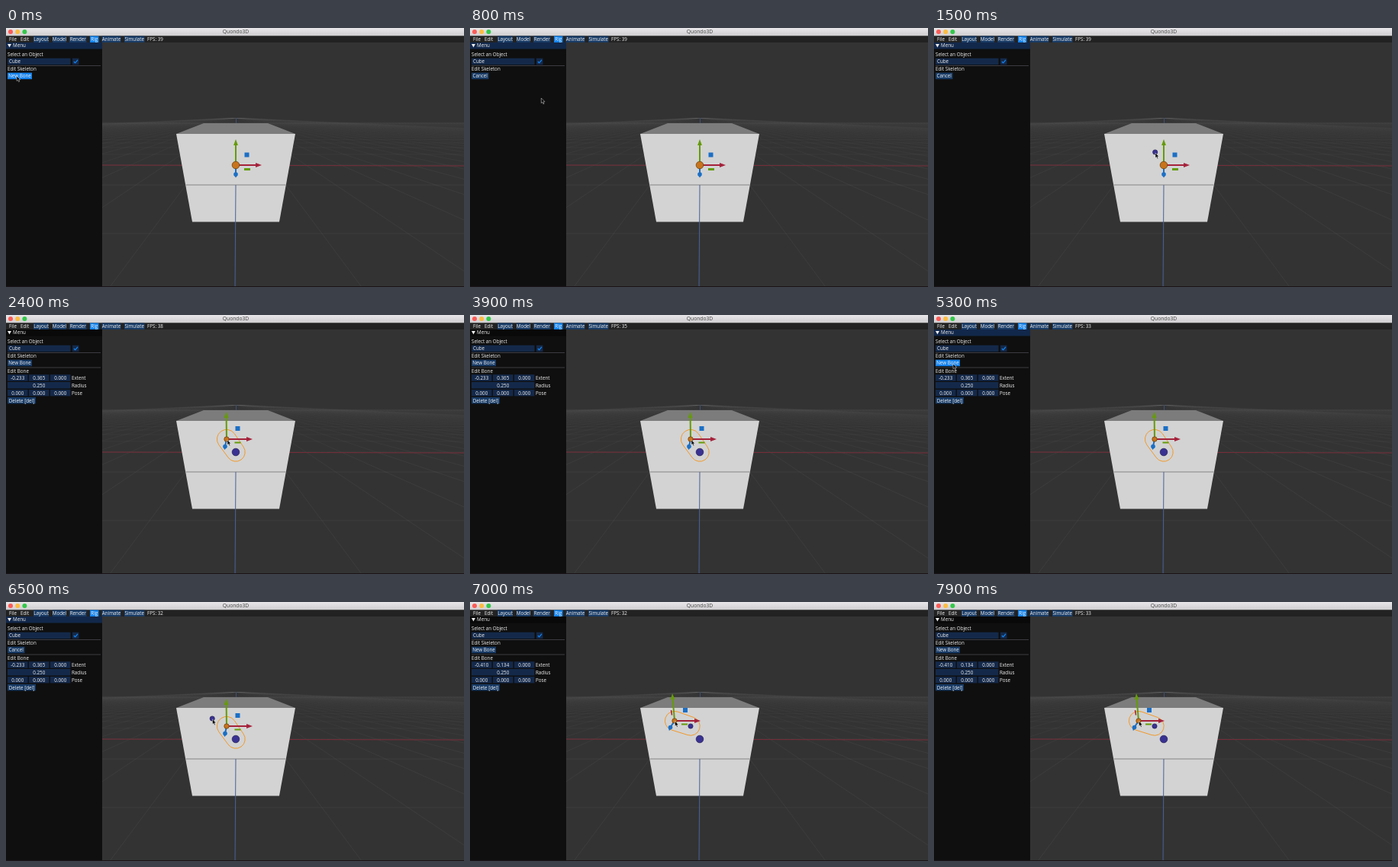
Recreate the animation shown at these times as an HTML page with a canvas. Size 600 by 340 pixels, loop 8000 ms.

```html
<!DOCTYPE html>
<html lang="en">
<head>
<meta charset="utf-8">
<title>Rig editor</title>
<style>
html, body { margin: 0; width: 100%; height: 100%; overflow: hidden; background: #333; }
canvas { display: block; }
</style>
</head>
<body>
<canvas id="stage" width="600" height="340"></canvas>
<script>
const LOOP = 8000, PANEL = 126;
const ctx = document.getElementById('stage').getContext('2d');
const BUTTON = '#183b66', HOVER = '#1483ee', FRAME = '#14294a', JOINT = '#3a3292';
const RED = '#a5223b', GREEN = '#659b08', BLUE = '#1b6fc6', ORANGE = '#f29929';

const BASE = [301, 180], TIP = [289, 163], TIP2 = [268, 156];
const FPS = [[0, 39], [2000, 38], [2900, 37], [3400, 36], [3800, 35], [4600, 34], [5000, 33], [5900, 32], [7700, 33]];
// Cursor moves: start, end, destination
const START = [14, 63];
const MOVES = [[500, 1350, 290, 164], [4300, 5150, 25, 64], [5500, 6400, 270.5, 154], [6500, 6700, 268.5, 156.5]];
const GIZMOS = {
  cube: { at: BASE, up: [0, -34], blue: [0, 12], square: [14.5, -13.5], flat: [15, 5.5, 3], ball: 4.8 },
  first: { at: TIP, up: [-.5, -36], blue: [-2, 9.5], square: [14.5, -14], flat: [14.5, 4.5, 2], ball: 3.2 },
  second: { at: TIP2, up: [-3, -36], blue: [-5.5, 8.5], square: [14, -14], flat: [13, 4.5, 2], ball: 3.2, stub: true }
};

function rect(x, y, w, h, fill) {
  ctx.fillStyle = fill;
  ctx.fillRect(x, y, w, h);
}
function poly(points, fill) {
  ctx.beginPath();
  points.forEach(p => ctx.lineTo(...p));
  ctx.closePath();
  ctx.fillStyle = fill;
  ctx.fill();
}
function line(x1, y1, x2, y2, color, width = 1) {
  ctx.beginPath();
  ctx.moveTo(x1, y1);
  ctx.lineTo(x2, y2);
  ctx.strokeStyle = color;
  ctx.lineWidth = width;
  ctx.stroke();
}
function dot([x, y], r, fill, outline) {
  ctx.beginPath();
  ctx.arc(x, y, r, 0, 7);
  ctx.fillStyle = fill;
  ctx.fill();
  if (outline) {
    ctx.strokeStyle = outline;
    ctx.lineWidth = .8;
    ctx.stroke();
  }
}
function text(s, x, y, align = 'left', color = '#f2f2f2', size = 6.25) {
  ctx.font = size + 'px "Open Sans", sans-serif';
  ctx.textAlign = align;
  ctx.fillStyle = color;
  ctx.fillText(s, x, y + 2.3);
}
function box(s, x, w, y, fill) {
  rect(x, y - 4.3, w, 8.5, fill);
  text(s, x + w / 2, y, 'center');
}

function cursorAt(t) {
  let [x, y] = START;
  for (const [from, to, tx, ty] of MOVES) {
    const u = Math.min(1, Math.max(0, (t - from) / (to - from)));
    const e = u * u * (3 - 2 * u);
    x += (tx - x) * e;
    y += (ty - y) * e;
  }
  return [x, y];
}

function drawScene() {
  rect(0, 0, 600, 340, '#333');
  ctx.save();
  ctx.beginPath();
  ctx.rect(PANEL, 118, 474, 222);
  ctx.clip();
  const grid = ctx.createLinearGradient(0, 118, 0, 200);
  grid.addColorStop(0, 'rgba(255,255,255,.012)');
  grid.addColorStop(1, 'rgba(255,255,255,.045)');
  for (let k = -30; k <= 30; k++) line(301, 118, 301 + k * 165, 340, grid);
  for (let z = -30; z < 3; z++) {
    const y = 118 + 209.6 / (3.38 - z);
    line(PANEL, y, 600, y, grid);
  }
  ctx.restore();
  line(PANEL, 180, 600, 181, '#782d3a');
  line(301.5, 118, 301.5, 126, '#3d5078');
  poly([[259, 125], [343, 125], [379, 139], [223, 139]], '#7c7c7c');
  poly([[223, 139], [379, 139], [358, 254.5], [244, 254.5]], '#d3d3d3');
  line(235.5, 206, 366.5, 206, '#858585');
  line(301, 206, 300, 340, '#466095');
}

function capsule([ax, ay], [bx, by]) {
  const a = Math.atan2(by - ay, bx - ax);
  ctx.beginPath();
  ctx.arc(ax, ay, 12.2, a + Math.PI / 2, a - Math.PI / 2);
  ctx.arc(bx, by, 12.6, a - Math.PI / 2, a + Math.PI / 2);
  ctx.closePath();
  ctx.strokeStyle = ORANGE;
  ctx.lineWidth = 1;
  ctx.stroke();
}

function arrow(dx, dy, color) {
  const n = Math.hypot(dx, dy), ux = dx / n, uy = dy / n, bx = dx - ux * 8, by = dy - uy * 8;
  line(0, 0, bx, by, color, 2);
  poly([[dx, dy], [bx - uy * 2.9, by + ux * 2.9], [bx + uy * 2.9, by - ux * 2.9]], color);
}

function drawGizmo({ at, up, blue, square, flat, ball, stub }) {
  ctx.save();
  ctx.translate(...at);
  line(0, 0, ...blue, BLUE, 2);
  dot(blue, 2.8, BLUE);
  poly([[blue[0] - 2.5, blue[1] + 1], [blue[0] + 2.5, blue[1] + 1], [blue[0] * 1.3, blue[1] + 4.5]], BLUE);
  arrow(...up, GREEN);
  arrow(34, 0, RED);
  rect(square[0] - 3, square[1] - 3, 6, 6, BLUE);
  rect(flat[0] - 4, flat[1] - flat[2] / 2, 8, flat[2], GREEN);
  if (stub) line(-4.5, -14, -3.5, -7.5, RED, 1.6);
  dot([0, 0], ball, '#c8741b', '#6b4314');
  ctx.restore();
}

function drawBars(t) {
  const shade = ctx.createLinearGradient(0, 0, 0, 10);
  shade.addColorStop(0, '#e9e7e9');
  shade.addColorStop(1, '#d0ced0');
  rect(0, 0, 600, 10.5, shade);
  ['#fc5b57', '#fdbc40', '#34c84a'].forEach((c, i) => dot([6 + 9.2 * i, 5], 3, c));
  text('Quondo3D', 301, 5, 'center', '#444', 6.7);
  rect(0, 10.5, 600, 8.5, '#222');
  text('File', 4, 14.8);
  text('Edit', 19, 14.8);
  [['Layout', 36, 20], ['Model', 61, 18], ['Render', 83, 22.5], ['Rig', 110, 11.5],
    ['Animate', 125.5, 25], ['Simulate', 155, 26.5]].forEach(([s, x, w]) =>
    box(s, x, w, 14.8, s === 'Rig' ? HOVER : BUTTON));
  text('FPS: ' + FPS.filter(f => f[0] <= t).pop()[1], 185, 14.8);
}

function drawPanel(t, pending, bones, cursor) {
  const active = t < 2000 || (t >= 5200 && t < 6800);
  rect(0, 19, PANEL, 321, '#0f0f0f');
  rect(0, 19, PANEL, 8.5, active ? '#12284b' : '#090909');
  poly([[2, 21], [7, 21], [4.5, 25.5]], '#f2f2f2');
  text('Menu', 9, 23);
  text('Select an Object', 2, 35);
  rect(2, 39.7, 82.5, 8.5, FRAME);
  text('Cube', 4, 44);
  rect(87, 39.7, 8.5, 8.5, FRAME);
  line(89, 44, 90.7, 46, HOVER, 1.2);
  line(90.5, 46, 94, 41.8, HOVER, 1.2);
  line(2, 49.5, 124, 49.5, '#3c3c42');
  text('Edit Skeleton', 2, 54);
  const width = pending ? 22.5 : 32;
  const over = cursor[0] < 2 + width && Math.abs(cursor[1] - 63) < 4.5;
  box(pending ? 'Cancel' : 'New Bone', 2, width, 63, over ? HOVER : BUTTON);
  if (!bones) return;
  line(2, 69, 124, 69, '#3c3c42');
  text('Edit Bone', 2, 73.3);
  const row = (values, y, label) => {
    const w = (82.5 - 1.5 * (values.length - 1)) / values.length;
    values.forEach((v, i) => box(v, 2 + i * (w + 1.5), w, y, FRAME));
    text(label, 86, y);
  };
  row(bones === 1 ? ['-0.233', '0.365', '0.000'] : ['-0.410', '0.134', '0.000'], 82.5, 'Extent');
  row(['0.250'], 92.3, 'Radius');
  row(['0.000', '0.000', '0.000'], 102.2, 'Pose');
  box('Delete [del]', 2, 37, 112.2, BUTTON);
}

function drawCursor([x, y]) {
  ctx.save();
  ctx.translate(x, y);
  const shape = [[0, 0], [0, 6.5], [1.5, 5.2], [2.6, 7.7], [3.7, 7.2], [2.7, 4.8], [4.7, 4.7]];
  poly(shape, '#000');
  ctx.strokeStyle = 'rgba(255,255,255,.75)';
  ctx.lineWidth = .6;
  ctx.stroke();
  ctx.restore();
}

function draw(t) {
  const cursor = cursorAt(t);
  const bones = (t >= 2000) + (t >= 6800);
  const pending = (t >= 200 && t < 2000) || (t >= 5400 && t < 6800);
  drawScene();
  if (bones) dot(BASE, 4.8, JOINT, '#28225f');
  if (bones === 1) capsule(BASE, TIP);
  if (bones === 2) {
    capsule(TIP, TIP2);
    dot(TIP, 3.1, JOINT, '#28225f');
  }
  drawGizmo([GIZMOS.cube, GIZMOS.first, GIZMOS.second][bones]);
  if (pending && cursor[0] > PANEL) dot([cursor[0] - .3, cursor[1] - 1], 3.1, JOINT, '#28225f');
  drawBars(t);
  drawPanel(t, pending, bones, cursor);
  rect(0, 339, 600, 1, '#1b1418');
  drawCursor(cursor);
}

function tick() {
  draw(performance.now() % LOOP);
  requestAnimationFrame(tick);
}
tick();
</script>
</body>
</html>
```
